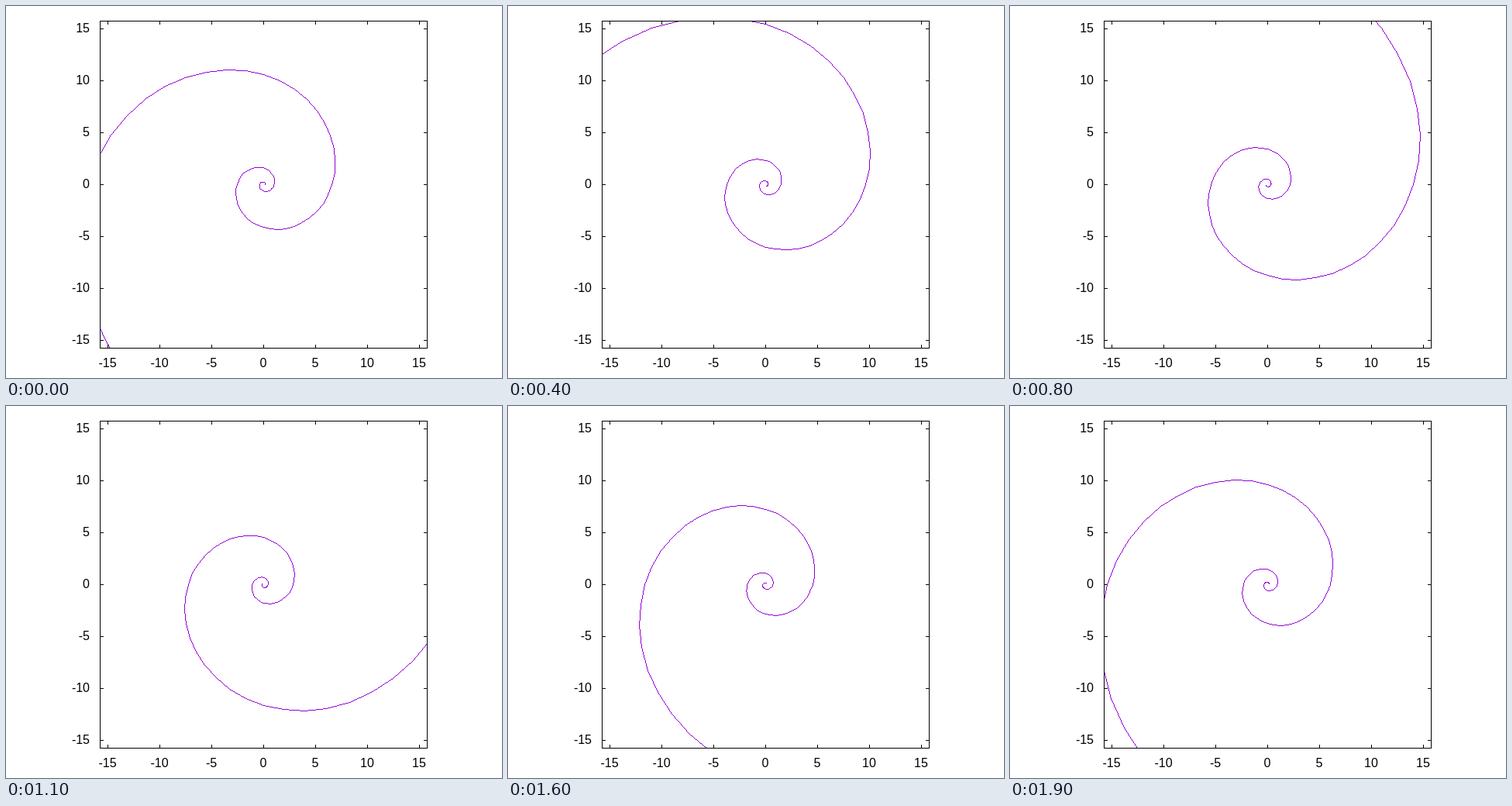
An HTML page with a canvas for the animation above (2000 ms loop, 640 by 480 pixels).

```html
<!DOCTYPE html>
<html lang="en">
<head>
<meta charset="utf-8">
<title>Rotating logarithmic spiral</title>
<style>
  html, body { margin: 0; width: 100%; height: 100%; overflow: hidden; background: #fff; }
  canvas { display: block; }
</style>
</head>
<body>
<canvas id="stage" width="640" height="480"></canvas>
<script>
const ctx = document.getElementById('stage').getContext('2d');
const LEFT = 121, TOP = 19, SIZE = 422;
const RIGHT = LEFT + SIZE, BOTTOM = TOP + SIZE;
const SCALE = SIZE / (10 * Math.PI);
const STEPS = 20, STEP_MS = 100;
const GROWTH = 0.3, DELTA = Math.PI / 20, FIRST = -40, LAST = 70;

const toX = x => Math.round(LEFT + SIZE / 2 + x * SCALE);
const toY = y => Math.round(TOP + SIZE / 2 - y * SCALE);

// One-pixel line without antialiasing
function drawLine(x0, y0, x1, y1) {
  const n = Math.max(Math.abs(x1 - x0), Math.abs(y1 - y0), 1);
  for (let i = 0; i <= n; i++) {
    ctx.fillRect(Math.round(x0 + (x1 - x0) * i / n), Math.round(y0 + (y1 - y0) * i / n), 1, 1);
  }
}

function drawAxes() {
  ctx.fillStyle = '#000';
  ctx.font = '16px "Liberation Sans", Arial, sans-serif';
  drawLine(LEFT, TOP, RIGHT, TOP);
  drawLine(LEFT, BOTTOM, RIGHT, BOTTOM);
  drawLine(LEFT, TOP, LEFT, BOTTOM);
  drawLine(RIGHT, TOP, RIGHT, BOTTOM);
  for (let value = -15; value <= 15; value += 5) {
    const x = toX(value), y = toY(value);
    drawLine(x, TOP, x, TOP + 4);
    drawLine(x, BOTTOM - 4, x, BOTTOM);
    drawLine(LEFT, y, LEFT + 4, y);
    drawLine(RIGHT - 4, y, RIGHT, y);
    ctx.textAlign = 'center';
    ctx.fillText(value, x, 466);
    ctx.textAlign = 'right';
    ctx.fillText(value, 108, y + 5);
  }
}

function drawSpiral(turn) {
  ctx.save();
  ctx.beginPath();
  ctx.rect(LEFT + 1, TOP + 1, SIZE - 1, SIZE - 1);
  ctx.clip();
  ctx.fillStyle = '#9400d3';
  let previous = null;
  for (let k = FIRST; k <= LAST; k++) {
    const theta = k * DELTA, radius = Math.exp(GROWTH * theta);
    const point = [toX(radius * Math.cos(theta - turn)), toY(radius * Math.sin(theta - turn))];
    if (previous) drawLine(...previous, ...point);
    previous = point;
  }
  ctx.restore();
}

function render() {
  const step = Math.floor(performance.now() / STEP_MS) % STEPS;
  ctx.fillStyle = '#fff';
  ctx.fillRect(0, 0, 640, 480);
  drawAxes();
  drawSpiral(step / STEPS * 2 * Math.PI);
  requestAnimationFrame(render);
}
render();
</script>
</body>
</html>
```
